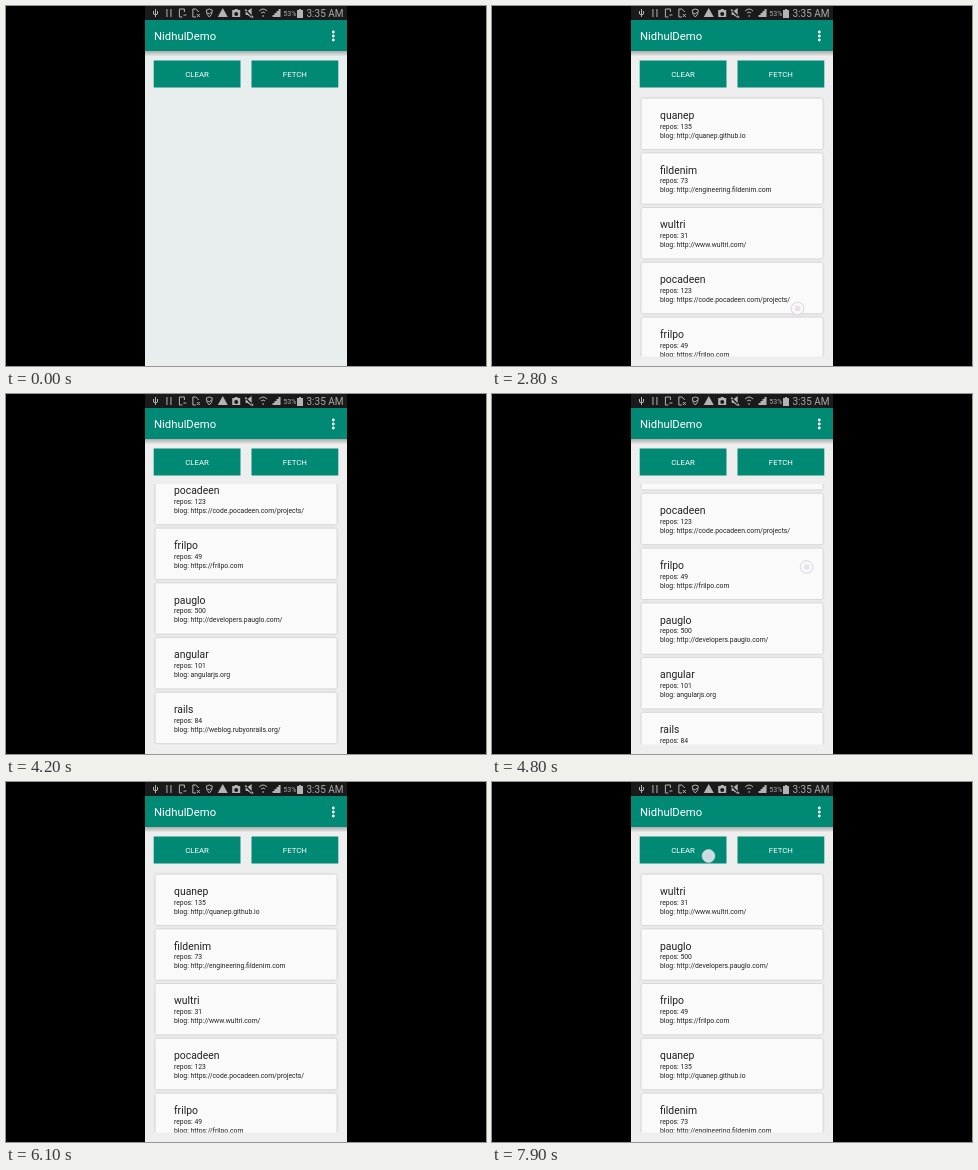
These frames come from a looping animation (480x360 px, 8 s). An HTML page:

```html
<!DOCTYPE html>
<html lang="en">
<head>
<meta charset="utf-8">
<title>Repository list</title>
<style>
  html, body { margin: 0; width: 100%; height: 100%; overflow: hidden; background: #000; }
  svg { display: block; width: 100vw; height: 100vh; font-family: Roboto, "Noto Sans", sans-serif; }
  .card rect { fill: #fafafa; filter: drop-shadow(0 .8px 1px rgba(0, 0, 0, .26)); }
  .card text { fill: #212121; font-size: 6.8px; }
  .card .name { font-size: 10.4px; }
  .bar { fill: #008975; }
  .label { fill: #fff; font-size: 7.85px; text-anchor: middle; }
  #icons { fill: none; stroke: #b4b4b4; }
  #icons .solid { fill: #b4b4b4; stroke: none; }
  .status { fill: #aaa; }
</style>
</head>
<body>
<svg viewBox="0 0 480 360">
  <defs>
    <linearGradient id="shade" x2="0" y2="1">
      <stop stop-color="#000" stop-opacity=".28"/>
      <stop offset="1" stop-color="#000" stop-opacity="0"/>
    </linearGradient>
    <clipPath id="listArea"><rect x="147" y="90" width="186" height="260.5"/></clipPath>
  </defs>
  <rect width="480" height="360"/>
  <rect x="139" width="202" height="14" fill="#1a1a1a"/>
  <rect id="page" x="139" y="14" width="202" height="346"/>
  <rect x="139" y="45" width="202" height="5.5" fill="url(#shade)"/>
  <rect class="bar" x="139" y="14" width="202" height="31"/>
  <text x="148" y="34" font-size="11.3" fill="#fff">NidhulDemo</text>
  <path d="M327.3 26v8.1" stroke="#fff" stroke-width="2.8" stroke-linecap="round" stroke-dasharray="0 4"/>
  <g id="icons"></g>
  <text class="status" x="277.3" y="9.8" font-size="7">53%</text>
  <text class="status" x="300.5" y="10.8" font-size="10">3:35 AM</text>
  <g id="buttons"></g>
  <g clip-path="url(#listArea)"><g id="list"></g></g>
  <g id="touch">
    <circle r="6.4" fill="#f8f8fc" fill-opacity=".8" stroke="#cfcfdf" stroke-opacity=".8"/>
    <circle r="2.8" fill="#dccbd4" fill-opacity=".5"/>
  </g>
</svg>
<script>
const LOOP = 8000, STEP = 100;
const PITCH = 54.75, SCROLL_END = 177, SWIPE_TIME = 916, REPLY_GAP = 100;
const $ = id => document.getElementById(id);

const accounts = {
  quanep: [135, "http://quanep.github.io"],
  fildenim: [73, "http://engineering.fildenim.com"],
  wultri: [31, "http://www.wultri.com/"],
  pocadeen: [123, "https://code.pocadeen.com/projects/"],
  frilpo: [49, "https://frilpo.com"],
  pauglo: [500, "http://developers.pauglo.com/"],
  angular: [101, "angularjs.org"],
  rails: [84, "http://weblog.rubyonrails.org/"]
};

// Accounts appear one by one in the order their replies arrive.
const fetches = [
  { start: 1800, end: 6500, order: Object.keys(accounts) },
  { start: 7200, end: LOOP, order: ["wultri", "pauglo", "frilpo", "quanep", "fildenim"] }
];

const tap = (at, x) => ({ at, x, y: 74, hold: 200, drift: 0, speed: 0 });
const swipe = (at, x, y, speed) => ({ at, x, y, hold: 600, drift: 8, speed });
const swipeUp = swipe(2800, 305.5, 302.5, -250);
const swipeDown = swipe(4600, 313, 123, 250);
const touches = [tap(1200, 303), swipeUp, swipeDown, tap(6400, 216.5), tap(6700, 303), tap(7700, 216.5)];

// Small marks centred on the status bar's evenly spaced slots.
const icons = [
  "M0-4v8M-2-2v3l2 1 2-1v-3",
  "M-2-4v8M2-4v8",
  "M2-1v-3h-5v8h3M1 2h3",
  "M3-1l-3-3h-3v8h3M1 1l3 3m0-3l-3 3",
  "M0-4l3 1q0 5-3 7q-3-2-3-7zM-2 0l2 1 2-2",
  "<M0-5l5 9h-10z",
  "<M-4-3h2l1-1h2l1 1h2v7h-8zM-2 1a2 2 0 1 0 4 0a2 2 0 1 0-4 0",
  "<M-4-2h2l4-3v10l-4-3h-2zM-4-4l8 8-1 1-8-8z",
  "M-4-2q4-4 8 0M-2 0q2-2 4 0M0 2v2",
  "<M-4 2h2v2h-2zM-2 0h2v4h-2zM0-2h2v6h-2zM2-4h2v8h-2z",
  "<M-3-3h2v-1h2v1h2v8h-6z"
];

const icon = (shape, i) => {
  const x = i < 10 ? 149.5 + 13.45 * i : 294;
  const solid = shape[0] === "<";
  return `<path class="${solid ? "solid" : ""}" fill-rule="evenodd"
    transform="translate(${x} 7)" d="${solid ? shape.slice(1) : shape}"/>`;
};

const button = (x, label) => `<rect class="bar" x="${x}" y="54.500" width="86.800" height="27"/>
  <text class="label" x="${x + 43.4}" y="71">${label}</text>`;

const card = (name, row) => {
  const [repos, blog] = accounts[name];
  return `<g class="card" transform="translate(0 ${row * PITCH})">
    <rect x="149.400" y="92.400" width="181.300" height="50.700" rx="1.500"/>
    <text class="name" x="168" y="112.900">${name}</text>
    <text x="168" y="122.700">repos: ${repos}</text>
    <text x="168" y="131.700">blog: ${blog}</text></g>`;
};

$("icons").innerHTML = icons.map(icon).join("");
$("buttons").innerHTML = button(147.7, "CLEAR") + button(245.5, "FETCH");
$("list").innerHTML = fetches.map(f => `<g>${f.order.map(card).join("")}</g>`).join("");
const groups = [...$("list").children];

const ease = p => (1 - Math.cos(Math.PI * Math.min(1, Math.max(0, p)))) / 2;
const swiped = (t, { at }) => ease((t - at) / SWIPE_TIME);
const show = (el, on) => el.setAttribute("display", on ? "inline" : "none");

function draw(now) {
  const t = Math.floor(now % LOOP / STEP) * STEP;
  $("page").setAttribute("fill", t < 1200 ? "#e8eeee" : "#eee");

  const scroll = SCROLL_END * (swiped(t, swipeUp) - swiped(t, swipeDown));
  $("list").setAttribute("transform", `translate(0 ${-scroll})`);
  fetches.forEach(({ start, end }, i) => {
    show(groups[i], t < end);
    [...groups[i].children].forEach((el, row) => show(el, t >= start + row * REPLY_GAP));
  });

  const active = touches.find(({ at, hold }) => t >= at && t <= at + hold);
  show($("touch"), active);
  if (active) {
    const held = (t - active.at) / 1000;
    const x = active.x + active.drift * held, y = active.y + active.speed * held;
    $("touch").setAttribute("transform", `translate(${x} ${y})`);
  }
}

function frame() {
  draw(performance.now() - began);
  requestAnimationFrame(frame);
}
const began = performance.now();
frame();
</script>
</body>
</html>
```
